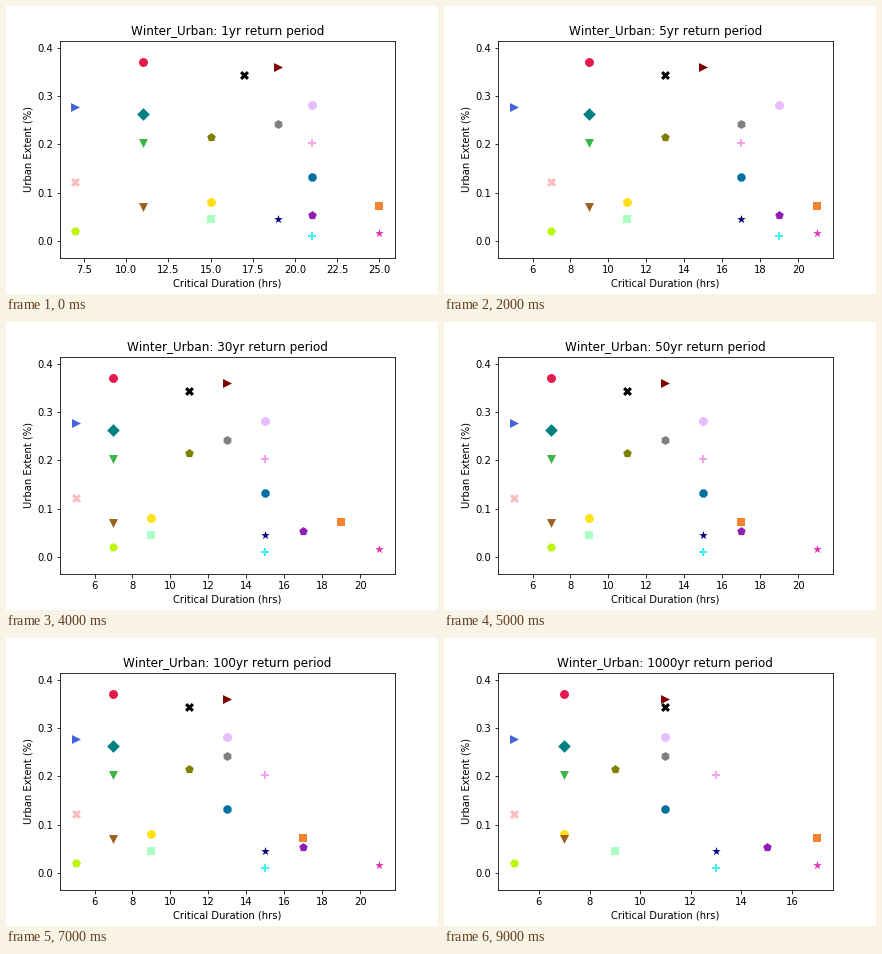
These frames come from a looping animation (432 px wide and 288 px high, 10000 ms). A matplotlib script:

```python
import numpy as np
import matplotlib.pyplot as plt
from matplotlib.animation import FuncAnimation
from matplotlib.ticker import MultipleLocator

plt.rcParams["font.family"] = "DejaVu Sans"
plt.rcParams["font.size"] = 10
plt.rcParams["text.kerning_factor"] = 6

PERIODS = [1, 2, 5, 10, 30, 50, 75, 100, 200, 1000]

# marker, colour, urban extent, key durations spread evenly over log(period)
SITES = [
    ("o", "#e6194b", 0.3700, (11, 7, 7)),
    ("v", "#3cb44b", 0.2030, (11, 7, 7)),
    ("o", "#ffe119", 0.0808, (14.1, 9.3, 7.2)),
    (">", "#4363d8", 0.2770, (6.5, 5, 5)),
    ("s", "#f58231", 0.0720, (24, 17.95, 16.5)),
    ("p", "#911eb4", 0.0529, (20.2, 15.5)),
    ("P", "#46f0f0", 0.0104, (21, 15.3, 13)),
    ("*", "#e032b4", 0.0166, (25.9, 20.1, 20.1, 17)),
    ("H", "#bcf60c", 0.0207, (7, 6.2, 5)),
    ("X", "#fabebe", 0.1217, (7, 5, 5)),
    ("D", "#008080", 0.2632, (11, 7, 7)),
    ("o", "#e6beff", 0.2819, (21.5, 15.2, 11)),
    ("v", "#9a6324", 0.0705, (11, 7, 7)),
    (">", "#800000", 0.3606, (18.1, 13.4, 11)),
    ("s", "#aaffc3", 0.0456, (14.1, 9, 9)),
    ("p", "#808000", 0.2150, (15, 11.3, 9)),
    ("P", "#f7a3ea", 0.2030, (20.1, 15, 13)),
    ("*", "#000075", 0.0450, (19, 15, 13)),
    ("h", "#808080", 0.2415, (19, 13, 11)),
    ("X", "#000000", 0.3430, (16.5, 11, 11)),
    ("8", "#0070a0", 0.1326, (20.1, 10.6)),
]

fig = plt.figure(figsize=(6, 4), dpi=72, facecolor="white")
ax = fig.add_axes([0.125, 0.125, 0.775, 0.755])


def duration(keys, period):
    """Critical duration, which only takes odd numbers of hours."""
    knots = np.linspace(0, 3, len(keys))
    return 2 * int(np.interp(np.log10(period), knots, keys) // 2) + 1


def draw(i):
    ax.clear()
    hours = [duration(keys, PERIODS[i]) for *_, keys in SITES]
    for x, (marker, color, y, _) in zip(hours, SITES):
        ax.scatter(x, y, s=80, marker=marker, color=color, linewidths=0)

    lo, hi = min(hours), max(hours)
    pad = 0.05 * (hi - lo) + 0.018
    ax.set_xlim(lo - pad, hi + pad)
    ax.set_ylim(-0.0354, 0.4152)
    ax.xaxis.set_major_locator(MultipleLocator(2.5 if hi - lo > 16 else 2))
    ax.yaxis.set_major_locator(MultipleLocator(0.1))
    ax.set_xlabel("Critical Duration (hrs)")
    ax.set_ylabel("Urban Extent (%)")
    ax.set_title(f"Winter_Urban: {PERIODS[i]}yr return period", fontsize=12)
    return []


anim = FuncAnimation(fig, draw, frames=len(PERIODS), init_func=lambda: draw(0),
                     interval=1000, repeat=True, repeat_delay=0)
plt.show()
```
